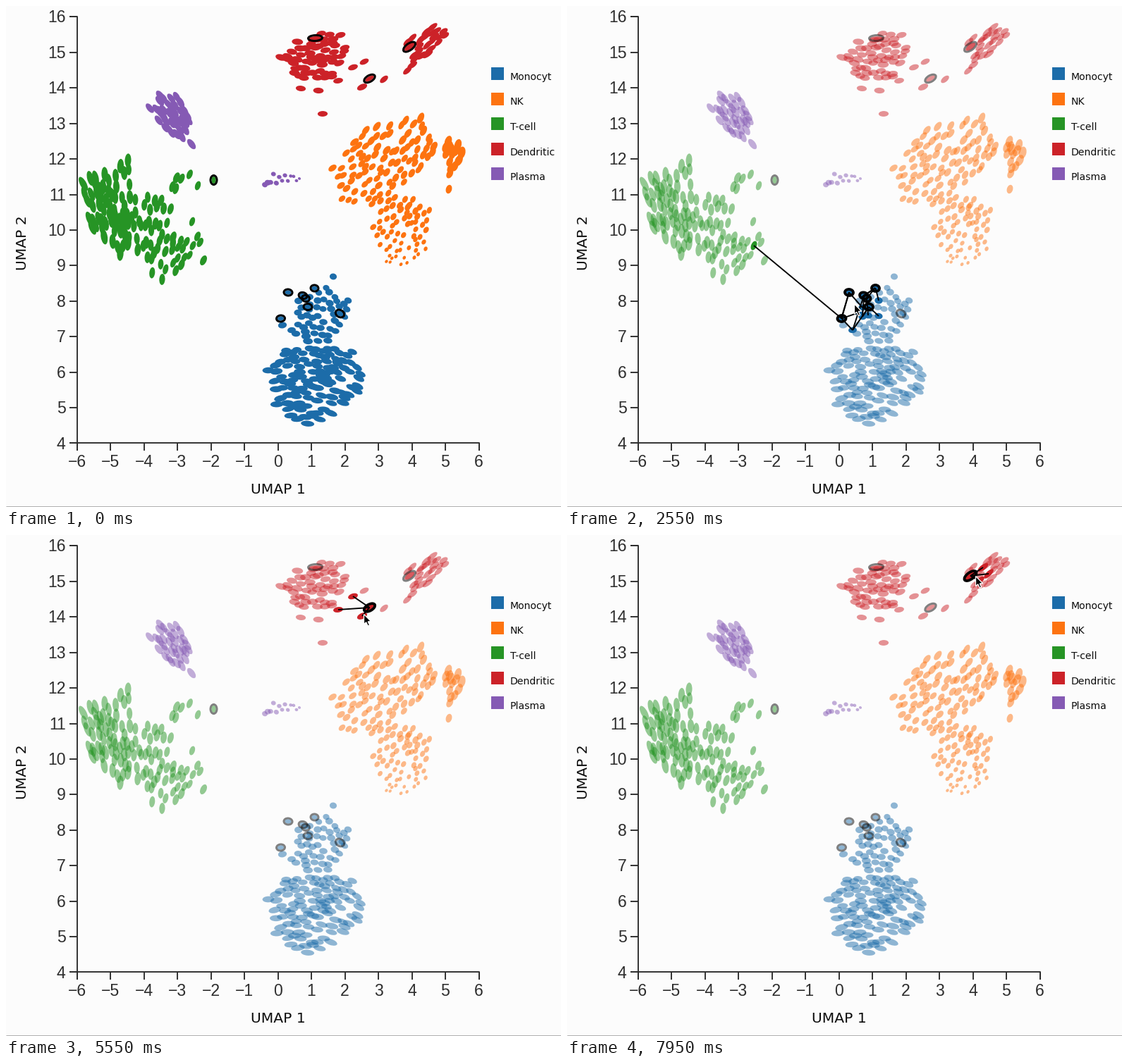
These frames come from a looping animation (787 by 711 pixels, 8000 ms). A matplotlib script:

```python
import numpy as np
import matplotlib.pyplot as plt
from matplotlib.animation import FuncAnimation
from matplotlib.collections import EllipseCollection, LineCollection
from matplotlib.colors import to_rgb
from matplotlib.patches import Polygon, Rectangle
from matplotlib.path import Path

W, H, STEP, FRAMES = 787, 711, 50, 160
BLUE, ORANGE, GREEN, RED, PURPLE = "#1c6ca9", "#fd7310", "#269425", "#cc2228", "#855ab4"
DARK, INK = "#2e2e2e", "#0c0c0c"
ENTER, HOLD, REACH, DIM = 350, 250, 42, 0.49
rng = np.random.default_rng(7)
ramp = np.interp

fig = plt.figure(figsize=((W + 1e-6) / 72, (H + 1e-6) / 72), dpi=72, facecolor="#fcfcfc")
ax = fig.add_axes([0, 0, 1, 1])
ax.set(xlim=(0, W), ylim=(H, 0))
ax.axis("off")

# ringed cells: x, y, width, height, angle, colour, ends of their links
rings = [
    (389.5, 443.5, 12, 9, -5, BLUE, [(265, 340), (400, 406), (405, 460), (414, 435)]),
    (400, 406.5, 12, 9, 5, BLUE, [(389, 443), (419, 428)]),
    (421, 411, 12, 9, 15, BLUE, [(437, 400), (405, 460), (419, 441)]),
    (425, 415, 11, 9, 15, BLUE, [(437, 400), (427, 439)]),
    (428, 427, 12, 9, 5, BLUE, [(442, 440), (419, 441), (405, 460)]),
    (437.5, 400.5, 11, 9, 5, BLUE, [(442, 418), (421, 411)]),
    (473.5, 436.5, 13, 10, 30, BLUE, [(480, 441)]),
    (294.5, 247, 13, 9, 90, GREEN, [(272, 255), (463, 230), (536, 216)]),
    (438.5, 45.5, 20, 8, -3, RED, [(447, 39), (438, 59), (431, 67)]),
    (515.5, 103, 17, 9, -30, RED, [(492, 87), (471, 106), (505, 115)]),
    (572, 58, 20, 9.5, -36, RED, [(598, 55), (590, 46), (585, 65)]),
]
ring_xy = np.array([r[:2] for r in rings])


def distance(points, origin):
    return np.hypot(*(np.asarray(points, float) - origin).T)


# ---- scatter layout -------------------------------------------------------
def scatter(outline, n, pts, stretch, tries=5):
    """Append n loosely spaced random points lying inside an outline."""
    path, box = Path(outline), np.array(outline, float)
    for _ in range(n):
        cand = rng.uniform(box.min(0), box.max(0), (60, 2))
        cand = cand[path.contains_points(cand)][:tries]
        others = np.array(pts + [(-99, -99)]) / stretch
        room = [distance(others, c / stretch).min() for c in cand]
        pts.append(tuple(cand[np.argmax(room)]))


def close_links(colour):
    """Link ends that belong to the same cluster as their ring."""
    ends = {p for r in rings if r[5] == colour for p in r[6] if distance([p], r[:2])[0] < 60}
    return [p for p in sorted(ends) if distance(ring_xy, p).min() > 3]


parts = []


def add_cells(pts, colour, length, breadth, angle, jitter=0.08):
    n = len(pts)
    size = 1 + rng.uniform(-jitter, jitter, n)
    turn = rng.uniform(-80, 80, n) * jitter
    parts.append(np.column_stack([pts, length * size, breadth * size, angle + turn,
                                  np.tile(to_rgb(colour), (n, 1))]))


def cluster(colour, shape, regions, keys=(), stretch=(1, 1)):
    pts = close_links(colour) + list(keys)
    for n, outline in regions:
        scatter(outline, n, pts, np.array(stretch))
    add_cells(pts, colour, *shape(*np.array(pts).T))


# T-cell: upright, longer on the left and leaning with x
cluster(GREEN,
        lambda x, y: (ramp(x, [110, 190, 270], [22, 17.5, 14]), ramp(x, [110, 270], [9, 8]),
                      ramp(x, [105, 150, 200, 265], [66, 87, 93, 112])),
        [(62, [(106, 243), (140, 238), (174, 220), (190, 310), (163, 356), (122, 322)]),
         (27, [(180, 275), (208, 268), (238, 285), (222, 340), (205, 365), (172, 335)]),
         (21, [(224, 330), (277, 322), (276, 336), (240, 388), (210, 388), (204, 368)]),
         (5, [(232, 252), (256, 232), (262, 240), (240, 262)])],
        keys=[(173, 219), (264, 306), (280, 361), (265, 340)], stretch=(1, 1.8))

# Plasma: slanted group and a sprinkle of dots
cluster(PURPLE, lambda x, y: (16.5 + 0 * x, 8.6, 56),
        [(33, [(222, 122), (244, 130), (260, 160), (256, 188), (228, 181), (207, 148)])],
        keys=[(204, 145), (263, 196), (242, 129)], stretch=(0.8, 1))
u = np.linspace(0, 1, 13)
sprinkle = np.column_stack([367 + 49 * u, 251 - 10 * u + rng.normal(0, 4, 13)])
add_cells(sprinkle, PURPLE, 8.5 - 4 * u, 7.6 - 3.6 * u, 20, 0.12)

# NK: shrinking and rounding off towards the bottom
def nk_shape(x, y):
    length = ramp(y, [160, 230, 290, 335, 365], [15, 12.5, 10.5, 8, 5]) + ramp(x, [600, 640], [0, 3])
    return length, length * ramp(y, [160, 365], [0.54, 0.8]), ramp(x, [470, 560, 650], [-38, -56, -72])


cluster(ORANGE, nk_shape,
        [(88, [(470, 235), (497, 177), (560, 161), (590, 160), (610, 200), (580, 250), (520, 285), (475, 278)]),
         (14, [(621, 190), (636, 192), (653, 203), (640, 230), (629, 244)]),
         (46, [(545, 268), (578, 272), (606, 292), (602, 318), (570, 345), (530, 345), (512, 315)]),
         (18, [(534, 342), (599, 325), (597, 346), (563, 369), (540, 367)])],
        keys=[(463, 230), (536, 216), (628, 260), (588, 159)])

# Dendritic: two groups joined by a thin bridge
cluster(RED,
        lambda x, y: (ramp(x, [480, 560, 600, 628], [14.8, 14, 18, 11]), ramp(x, [480, 600], [8.2, 7]),
                      ramp(x, [390, 425, 470, 540], [16, 4, -14, -39])),
        [(50, [(393, 75), (410, 52), (450, 37), (474, 40), (484, 56), (464, 100), (425, 106), (402, 90)]),
         (23, [(566, 93), (576, 68), (568, 48), (610, 23), (628, 36), (620, 52), (584, 86)])],
        keys=[(418, 117), (443, 120), (449, 153), (508, 79), (536, 104), (390, 73)], stretch=(1.6, 1))

# Monocyte: round on top, wide and flat below
cluster(BLUE,
        lambda x, y: (ramp(y, [400, 470, 500, 590], [10, 12.5, 15.5, 18.5]), ramp(y, [400, 590], [8.8, 8]),
                      ramp(x, [375, 430, 470, 500], [-8, 4, 17, 26])),
        [(38, [(412, 418), (455, 402), (486, 416), (476, 468), (440, 482), (410, 470)]),
         (104, [(380, 505), (400, 486), (490, 486), (504, 515), (498, 548), (448, 588), (424, 594), (378, 566)])],
        keys=[(464, 384), (454, 400), (392, 453), (485, 418), (372, 517)], stretch=(1.8, 1))

first_ring = sum(map(len, parts))
for rx, ry, rw, rh, tilt, colour, _ in rings:
    add_cells([(rx, ry)], colour, rw - 3, rh - 3, tilt, 0)
cells = np.concatenate(parts)
linked = [[distance(cells[:first_ring, :2], p).argmin() for p in r[6]
           if distance(ring_xy, p).min() > 3] for r in rings]


def ellipses(xy, w, h, angle, **style):
    group = EllipseCollection(w, h, angle, units="xy", offsets=xy,
                              offset_transform=ax.transData, **style)
    ax.add_collection(group)
    return group


dots = ellipses(cells[:, :2], *cells[:, 2:5].T, linewidths=0, zorder=2)
edges = LineCollection([], colors="black", linewidths=1.9, zorder=3)
ax.add_collection(edges)
halos = ellipses(ring_xy, *np.array([r[2:5] for r in rings]).T, facecolors="none", zorder=4)


# ---- axes, labels, legend -------------------------------------------------
def stroke(xs, ys, colour=DARK, lw=1.9):
    ax.plot(xs, ys, color=colour, lw=lw, solid_capstyle="butt", zorder=1)


stroke([90, 100.5, 100.5, 90], [15.5, 15.5, 620.5, 620.5])
stroke([100.5, 100.5, 670.5, 670.5], [631, 620.5, 620.5, 631])
tick_font = dict(family="Liberation Sans", size=23, color=DARK, va="baseline")
for i in range(13):
    tx, ty = 100.5 + 47.5 * i, 620.5 - 50.42 * i
    stroke([tx, tx], [620.5, 631])
    stroke([90, 100.5], [ty, ty])
    ax.text(tx, 654, str(i - 6).replace("-", "\u2212"), ha="center", **tick_font)
    ax.text(84.5, ty + 8, str(i + 4), ha="right", **tick_font)

title_font = dict(family="DejaVu Sans", size=20.2, color=INK)
ax.text(386, 692, "UMAP 1", ha="center", va="baseline", **title_font)
ax.text(23, 336, "UMAP 2", ha="center", va="center", rotation=90, **title_font)

window = Rectangle((0, 0), 777, H, transform=ax.transData)
legend = [("Monocyt", BLUE), ("NK", ORANGE), ("T-cell", GREEN), ("Dendritic", RED), ("Plasma", PURPLE)]
for i, (name, colour) in enumerate(legend):
    top = 87 + 35.6 * i
    ax.add_patch(Rectangle((688, top), 18, 18, color=colour, lw=0))
    label = ax.text(714.5, top + 17.8, name, family="DejaVu Sans", size=14, color=INK, va="baseline")
    label.set_clip_path(window.get_path(), window.get_transform())
    label.set_clip_on(True)

stroke([786.5, 786.5], [0, H], "#b0b0b0", 1)
stroke([0, W], [710.5, 710.5], "#b0b0b0", 1)

# ---- pointer --------------------------------------------------------------
arrow = np.array([(0, 0), (0, 14.2), (3.2, 11.3), (5.7, 16.6), (8.2, 15.5), (5.8, 10.4), (10.2, 10.2)])
pointer = Polygon(arrow, closed=True, facecolor="black", edgecolor="white", lw=1.3, zorder=6)
ax.add_patch(pointer)

# arrival time and place; the pointer rests for HOLD at each stop
stops = [(ENTER - HOLD, 790, 560), (1350, 557.5, 456), (2400, 407.5, 423), (4050, 314.5, 265),
         (5450, 507.5, 112.5), (6450, 452.5, 58.5), (7700, 579.5, 58.5)]


def pointer_at(t):
    place = np.array(stops[0][1:], float)
    for (t0, *a), (t1, *b) in zip(stops, stops[1:]):
        u = np.clip((t - t0 - HOLD) / (t1 - t0 - HOLD), 0, 1)
        place += np.subtract(b, a) * u * u * (3 - 2 * u)
    return place


def draw(frame):
    t = frame * STEP
    inside = t >= ENTER
    tip = pointer_at(t)
    near = inside & (distance(ring_xy, tip) < REACH)

    alpha = np.full(len(cells), DIM if inside else 1.0)
    alpha[first_ring:][near] = 1
    segments = []
    for i in np.flatnonzero(near):
        alpha[linked[i]] = 1
        segments += [[ring_xy[i], p] for p in rings[i][6]]
    dots.set_facecolor(np.column_stack([cells[:, 5:], alpha]))
    edges.set_segments(segments)

    tone = np.zeros((len(rings), 4))
    tone[:, 3] = alpha[first_ring:]
    halos.set_edgecolor(tone)
    halos.set_linewidth(np.where(near, 3.8, 3.0))

    pointer.set_visible(inside)
    pointer.set_xy(arrow + tip)
    return dots, edges, halos, pointer


anim = FuncAnimation(fig, draw, frames=FRAMES, interval=STEP, repeat=True, repeat_delay=0, blit=False)
plt.show()
```
